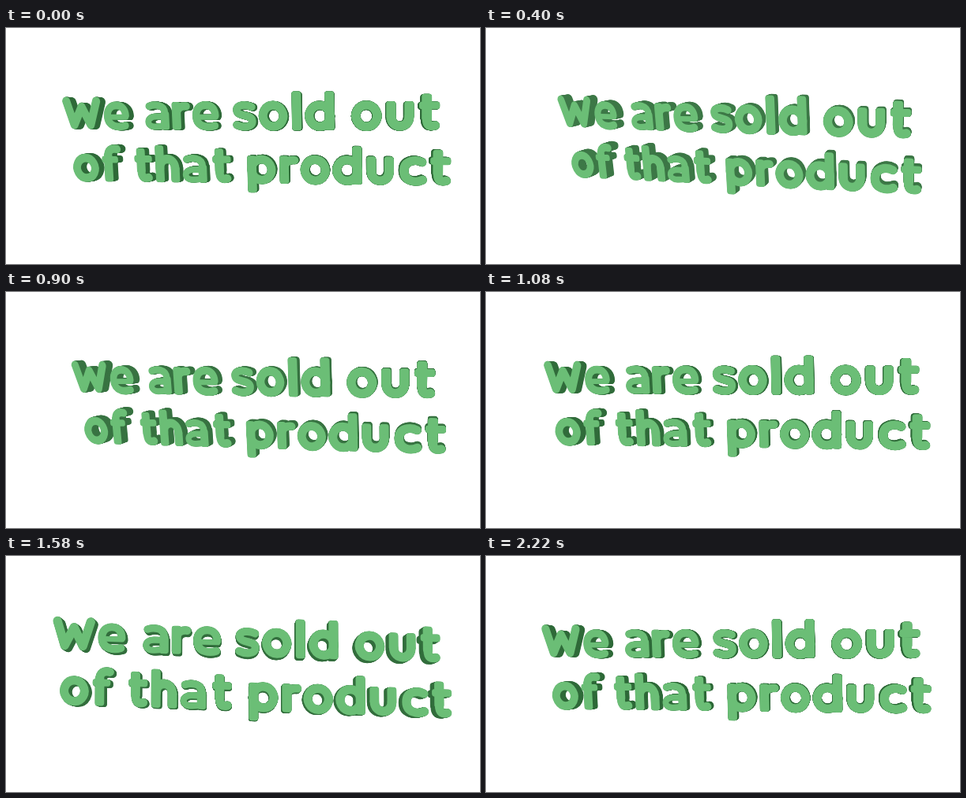
Write an HTML page with a canvas that moves like this. It is 600 px wide and 300 px high and loops after 2.24 s.

```html
<!DOCTYPE html>
<html lang="en">
<head>
<meta charset="utf-8">
<title>We are sold out of that product</title>
<style>
  html, body { margin: 0; width: 100%; height: 100%; overflow: hidden; background: #fff; }
  canvas { display: block; }
</style>
</head>
<body>
<canvas id="stage" width="600" height="300" role="img" aria-label="We are sold out of that product"></canvas>
<script>
const ctx = document.getElementById('stage').getContext('2d');
const LOOP = 2240, STEP = 20, LAYERS = 14, DEPTH = 0.022, FOCAL = 1750;
const HALF = 246, BULGE = 15;

// Rounded lettering. Arrays are bars (x, y, w, h); strings are strokes "width:path".
const bowl = '11.2:M18.5-31.4a13 13.4 0 1 1-.01 0z';
const shapes = {
  W: ['11.5:M6-37.5L15.5-6.5L27.5-30L39-6.5L49-37.5'],
  e: [[8, -20, 27, 7], '10:M30-5.5C23-3 5.5-2 5.5-18C5.5-27 11-31.8 18.5-31.8C27-31.8 31-26 31-18.5'],
  a: [[22.5, -24, 11.5, 24], '9.5:M7-30.5C13-33 28.5-34 28.5-21', '8.2:M27-17.2H16C2-17.2 2-4 14-4C19-4 24-4.6 28-6'],
  r: [[0, -36, 12, 36], '10.5:M6-18C6-28 12-31 19.5-30.5'],
  s: ['10:M25-29.5C18-33 5.5-32.5 5.5-25.5C5.5-16 25.5-21 25.5-11.5C25.5-2.5 12-3 5-6.5'],
  o: [bowl],
  l: [[0, -49, 12, 49.5]],
  d: [[25, -49, 12, 49], bowl],
  u: [[0, -36, 11.7, 22], [21.8, -36, 11.7, 22], '11.5:M5.9-17C5.9-1.3 27.6-1.3 27.6-17'],
  t: [[3, -45, 12, 33], [0, -35.5, 24.5, 9.5], '11:M9-15C9-5 13-4.5 19-6'],
  f: [[3, -38, 12, 38], [0, -34, 23, 9], '11:M8.7-32C8.7-43 15-45 22-43.5'],
  h: [[0, -49, 12, 49], [21, -22, 12, 22], '11.7:M6-18C6-35 27-35 27-18'],
  p: [[0, -36, 12, 48], bowl],
  c: ['11:M27.5-29.2C20-33.2 5.8-31.5 5.8-18C5.8-4.5 20-2.8 28-6.8']
};

const glyphs = {};
for (const [name, parts] of Object.entries(shapes)) {
  const fill = new Path2D(), strokes = [];
  for (const part of parts) {
    if (Array.isArray(part)) {
      fill.roundRect(...part, 3.6);
    } else {
      const [width, d] = part.split(':');
      strokes.push([+width, new Path2D(d)]);
    }
  }
  glyphs[name] = { fill, strokes };
}

const lines = [
  { y: 0, text: 'Wearesoldout', x: [-245, -187, -130, -92, -65, -11, 23, 65.5, 82, 140, 182.5, 222] },
  { y: 69, text: 'ofthatproduct', x: [-235, -193, -147, -118, -82, -40, 6, 48, 75, 115.5, 158, 198, 235.5] }
];
const letters = lines.flatMap(line =>
  [...line.text].map((ch, i) => ({ glyph: glyphs[ch], x: line.x[i], y: line.y })));

// Perspective view of the gently bowed text sheet for a swing s between -1 and 1.
function view(s) {
  const yaw = 0.26 + 0.22 * s;
  const cos = Math.cos(yaw), sin = Math.sin(yaw);
  const py = 0.00015 + 0.0002 * s;
  const shear = 0.032 + 0.033 * s;
  const slope = 0.002 + 0.002 * s + 0.035 * s * s;
  const tall = 0.992 - 0.01 * s;
  const top = 129.6 + 3 * s + 0.8 * s * s;
  return (x, y) => {
    const w = 1 - x * sin / FOCAL + py * y;
    const bow = BULGE * (1 - (x / HALF) ** 2);
    return [302 + (x * cos - bow * sin + y * shear) / w, top + (x * cos * slope + y * tall) / w];
  };
}

// Local affine fit of the view around one letter.
function place({ x, y }, project) {
  const u = 18, v = -18;
  const [x0, y0] = project(x + u, y + v);
  const [x1, y1] = project(x + u + 1, y + v);
  const [x2, y2] = project(x + u, y + v + 1);
  const a = x1 - x0, b = y1 - y0, c = x2 - x0, d = y2 - y0;
  return [a, b, c, d, x0 - a * u - c * v, y0 - b * u - d * v];
}

function paint(glyph) {
  ctx.fill(glyph.fill);
  for (const [width, path] of glyph.strokes) {
    ctx.lineWidth = width;
    ctx.stroke(path);
  }
}

function draw(time) {
  const t = Math.floor((time % LOOP) / STEP) * STEP;
  const s = Math.sin(2 * Math.PI * t / LOOP);
  const project = view(s);
  const placed = letters.map(l => ({ glyph: l.glyph, m: place(l, project) }));
  const vx = 435 + 150 * s, vy = 128 - 130 * s;
  const lit = Math.max(s, 0) * 15 + Math.max(-s, 0) * 4;

  ctx.setTransform(1, 0, 0, 1, 0, 0);
  ctx.fillStyle = '#fff';
  ctx.fillRect(0, 0, 600, 300);
  ctx.lineCap = ctx.lineJoin = 'round';

  // Back layers shrink towards the vanishing point of the depth direction.
  for (let i = LAYERS; i >= 0; i--) {
    const k = DEPTH * i / LAYERS, z = 1 / (1 + k);
    ctx.fillStyle = ctx.strokeStyle = i ? `rgb(${47 + lit},${106 + lit},${57 + lit})` : '#6bbe76';
    for (const { glyph, m } of placed) {
      ctx.setTransform(m[0] * z, m[1] * z, m[2] * z, m[3] * z, (m[4] + k * vx) * z, (m[5] + k * vy) * z);
      paint(glyph);
    }
  }
}

const start = performance.now();
function tick() {
  draw(performance.now() - start);
  requestAnimationFrame(tick);
}
tick();
</script>
</body>
</html>
```
